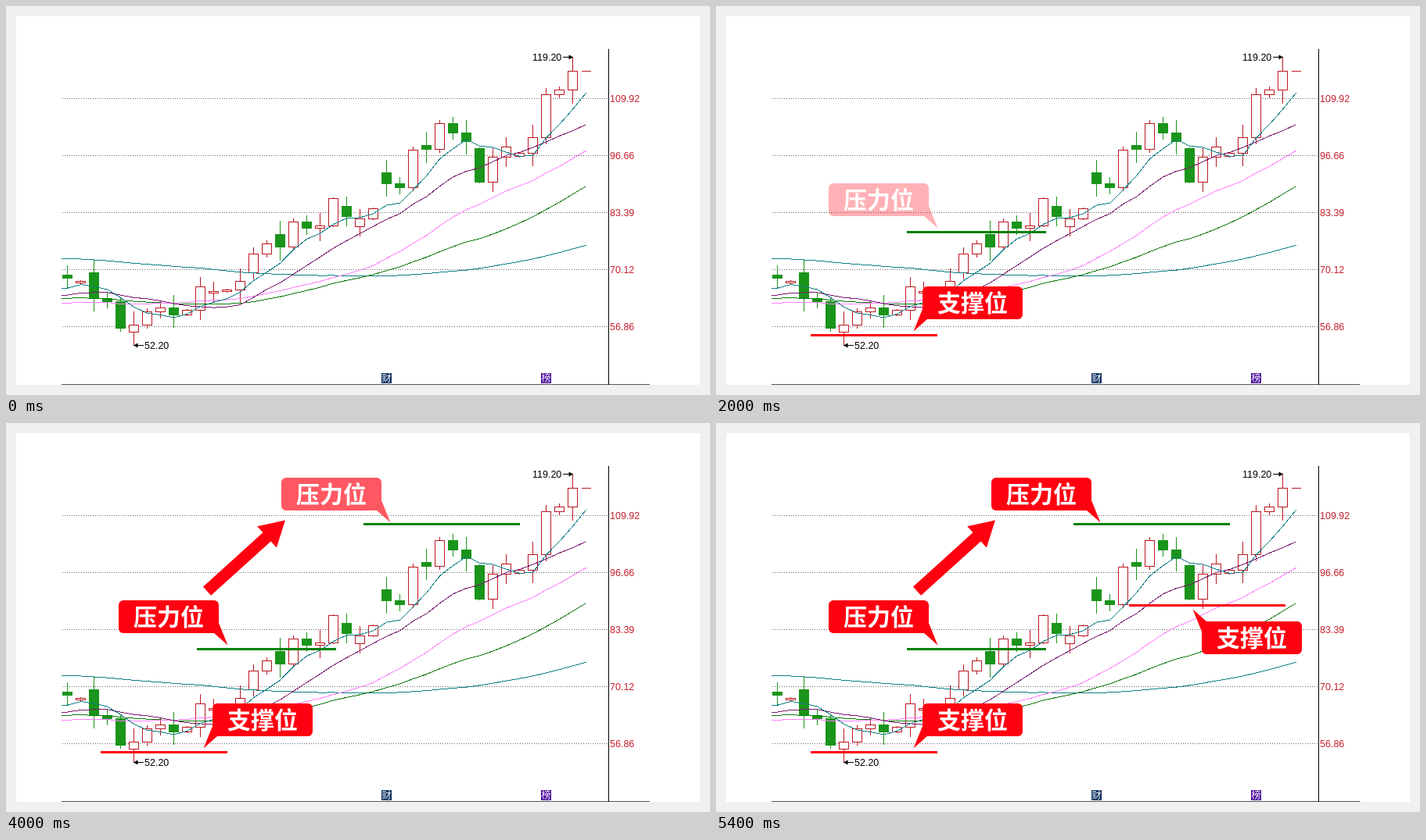
Recreate the animation shown at these times as an HTML page. Size 900 px wide and 498 px high, loop 8400 ms.

```html
<!DOCTYPE html>
<html lang="zh">
<head>
<meta charset="utf-8">
<title>支撑位与压力位</title>
<style>
  html, body { margin: 0; width: 100%; height: 100%; overflow: hidden; background: #f0f0f0; }
  svg { display: block; }
  .crisp { shape-rendering: crispEdges; }
  text { font: 12.5px "Liberation Sans", Arial, sans-serif; }
  .badge { font: 12px "Noto Sans CJK SC", "Noto Sans CJK", sans-serif; fill: #fff; text-anchor: middle; }
  .label { font: bold 30px "Noto Sans CJK SC", "Noto Sans CJK", sans-serif; fill: #fff; text-anchor: middle; }
</style>
</head>
<body>
<svg id="stage" width="900" height="498" viewBox="0 0 900 498"></svg>
<script>
const RED = '#ff0010', GREEN = '#008000', UP = '#bb1822', DOWN = '#1a941a', TEAL = '#0c7f86';
const LOOP = 8400, STEP = 200, FADE_STEPS = 3;
const PEAK_DAY = 38, TROUGH_DAY = 5;

// Price levels before the visible days, as [days, y]; they feed the moving averages.
const history = [[10, 312], [20, 252], [10, 361], [4, 374], [6, 401], [4, 379], [2, 376], [3, 360]]
  .flatMap(([days, y]) => Array(days).fill(y));

// Closing prices as y positions.
const closes = [
  348, 352, 374, 378, 412, 408, 391, 386, 395, 389, 359, 365, 363, 352, 317, 304, 308, 276, 284, 281,
  246, 269, 272, 259, 227, 232, 184, 183, 150, 162, 173, 225, 193, 180, 188, 168, 113, 107, 83, 83
];
const series = [...history, ...closes];

// A day opens at the previous close, apart from these larger gaps.
const gaps = { 0: -16, 1: 6, 2: -11, 5: 5, 11: 8, 14: -11, 16: -12, 21: 10, 22: 13, 24: -46, 27: -6, 31: 9, 34: 12 };

const dayX = day => 78 + 17 * day;
const wickLength = offset => Math.round(9 + 8 * Math.cos(2 * Math.PI * offset / 2.75));

const rect = (x, y, w, h, fill, extra = '') =>
  `<rect x="${x}" y="${y}" width="${w}" height="${h}" fill="${fill}" ${extra}/>`;
const text = (x, y, content, attrs = '') => `<text x="${x}" y="${y}" ${attrs}>${content}</text>`;
const polygon = (points, fill, extra = '') =>
  `<polygon points="${points.join(' ')}" fill="${fill}" ${extra}/>`;
const crisp = content => `<g class="crisp">${content}</g>`;

function candle(close, day) {
  const x = dayX(day);
  const open = series[history.length + day - 1] + (gaps[day] || 0);
  const falling = close > open, color = falling ? DOWN : UP;
  const high = Math.min(open, close) - wickLength(day - PEAK_DAY);
  const low = Math.max(open, close) + wickLength(day - TROUGH_DAY);
  const wick = open === close ? '' : rect(x, high, 1, low - high + 1, color);
  return wick + `<path d="M${x - 5.5} ${open + .5}H${x + 6.5}V${close + .5}H${x - 5.5}Z"
    fill="${falling ? DOWN : '#fff'}" stroke="${color}"/>`;
}

function average(days, color) {
  const points = closes.map((_, day) => {
    const end = history.length + day + 1;
    const sum = series.slice(end - days, end).reduce((total, y) => total + y, 0);
    return [dayX(day) + .5, sum / days + .5];
  });
  return `<polyline points="71,${points[0][1]} ${points.join(' ')}" fill="none" stroke="${color}"/>`;
}

function gridLine(value, i) {
  const y = 410 - 73 * i;
  return crisp(`<path d="M72 ${y + .5}H770" stroke="#666" stroke-dasharray="1 2"/>`) +
    text(772, y + 5, value, 'fill="#c4202e"');
}

const badge = (x, char, color) => rect(x, 470, 13, 13, color) + text(x + 6.5, 481, char, 'class="badge"');

// A small pointer with its tip at x, y; direction is 1 for right, -1 for left.
const pointer = (x, y, direction) =>
  crisp(rect(direction > 0 ? x - 13 : x, y - .5, 13, 1, '#000')) +
  polygon([[x - 5.5 * direction, y - 3], [x, y], [x - 5.5 * direction, y + 3]], '#000');

function chart() {
  return rect(13, 13, 874, 472, '#fff') +
    ['56.86', '70.12', '83.39', '96.66', '109.92'].map(gridLine).join('') +
    crisp(
      rect(71, 484, 752, 1, '#555') + rect(770, 55, 1, 430, '#000') +
      closes.map(candle).join('') +
      average(60, TEAL) + average(30, '#0b780b') + average(20, '#ff80ff') +
      average(10, '#7a1a70') + average(5, TEAL)
    ) +
    pointer(725, 65.5, 1) + text(673, 70, '119.20') +
    pointer(163, 434.5, -1) + text(177, 439, '52.20') +
    badge(480, '财', '#0b3060') + badge(684, '榜', '#4b0a9c');
}

const level = (x, y, width, color) => rect(x, y, width, 3, color);

// sideX and sideY pick the corner the tail grows from.
function label(x, y, content, sideX, sideY) {
  const cornerX = sideX > 0 ? x + 128 : x, cornerY = sideY > 0 ? y + 42 : y;
  const tail = [[0, -13], [11.5, 15.5], [-6, 0], [-12, -13]]
    .map(([dx, dy]) => [cornerX + dx * sideX, cornerY + dy * sideY]);
  return rect(x, y, 128, 42, RED, 'rx="6"') + polygon(tail, RED) +
    text(x + 64, y + 32, content, 'class="label"');
}

const arrow = polygon(
  [[0, -7.6], [103.3, -7.6], [103.3, -18.4], [135, 0], [103.3, 18.4], [103.3, 7.6], [0, 7.6]],
  RED, 'transform="translate(257 215.2) rotate(-42.2)"');

const notes = [
  level(121, 420, 162, RED),
  label(264, 359, '支撑位', -1, 1),
  level(244, 288, 178, GREEN),
  label(144, 227, '压力位', 1, 1),
  arrow,
  level(457, 128, 200, GREEN),
  label(352, 70, '压力位', 1, 1),
  level(528, 232, 200, RED),
  label(621, 254, '支撑位', -1, -1)
];

const stage = document.getElementById('stage');
stage.innerHTML = chart() + notes.map(note => `<g class="note" opacity="0">${note}</g>`).join('');
const noteGroups = stage.querySelectorAll('.note');

// Notes fade in one after another, each in three hard steps.
function draw(now) {
  const step = Math.floor(now % LOOP / STEP);
  noteGroups.forEach((group, i) => {
    const shown = Math.min(FADE_STEPS, Math.max(0, step - i * FADE_STEPS));
    group.setAttribute('opacity', Math.max(0, .35 * shown - .05));
  });
  requestAnimationFrame(draw);
}
requestAnimationFrame(draw);
</script>
</body>
</html>
```
